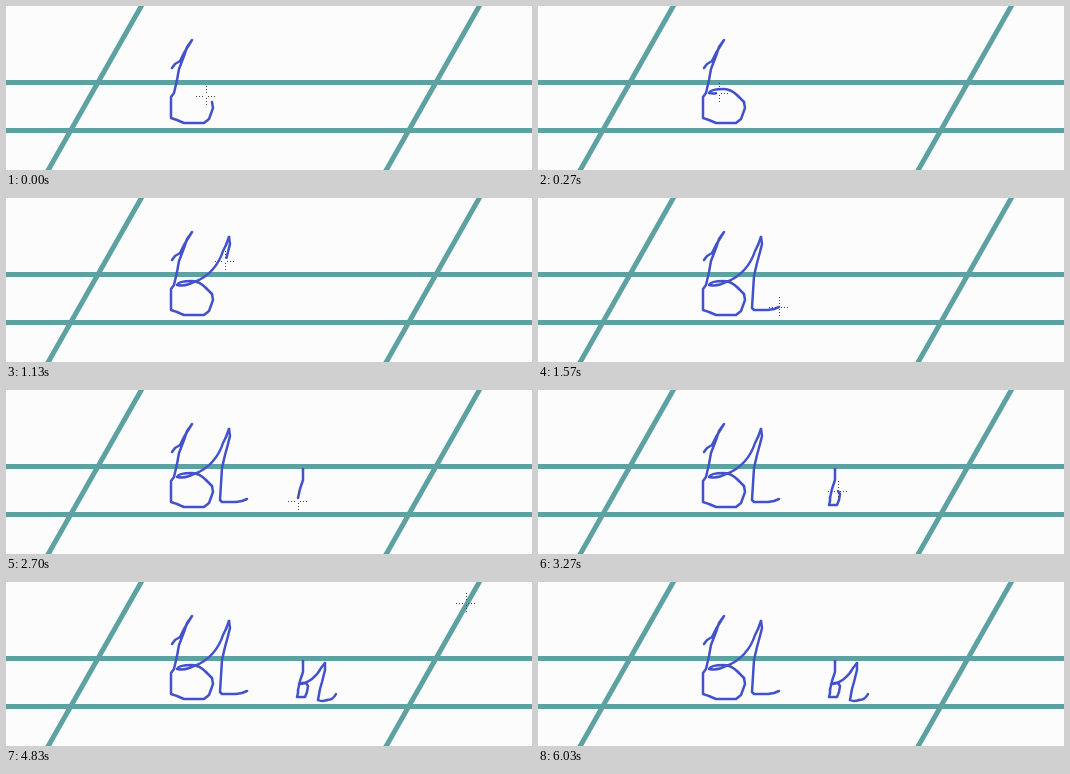
These frames come from a looping animation (526x164 px, 6.4 s). An HTML page:

```html
<!DOCTYPE html>
<html lang="en">
<head>
<meta charset="utf-8">
<title>Handwriting on ruled lines</title>
<style>
  html, body { margin: 0; width: 100%; height: 100%; overflow: hidden; background: #fcfcfd; }
  svg { display: block; }
  path { fill: none; }
  #rules { stroke: #5da1a2; stroke-width: 5; }
  #ink { stroke: #4352c8; stroke-width: 2.5; stroke-linecap: round; stroke-linejoin: round; }
  #cursor { stroke: #444; stroke-width: 1; stroke-dasharray: 1 2; shape-rendering: crispEdges; }
</style>
</head>
<body>
<svg width="526" height="164" viewBox="0 0 526 164">
  <path id="rules" d="M0 76.5H526M0 124.5H526M137 -3L40 168M475 -3L378 168"/>
  <g id="ink">
    <path d="M166 62L169 58 174 55 178 47 186 34 181 41 178 50 173 63 171 74 168 87 165 91V112L171 114 178 117H198L203 113 207 102 206 96"/>
  </g>
  <path id="cursor" d="M-10 .5H-1M2 .5H11M.5 -10V-1M.5 2V11"/>
</svg>
<script>
const LOOP = 6400, FPS = 30, LAG = .6, HIDE = 180;
const ink = document.getElementById('ink');
const cursor = document.getElementById('cursor');

// [start tick, end tick, path, pen is up]
const moves = [
  [-.6, 0, 'M206 96L200 90'],
  [0, 19, 'M200 90C196 86 191 83 186 83C179 83 172 84 171 87C176 88 183 87 188 84C203 79 213 66 217 53L220 47'],
  [19, 23, 'M220 47L223 39'],
  [30, 46, 'M223 39L224 46 222 54 219 65 216 78 214 110 216 112H230L236 111 241 109'],
  [51, 61, 'M241 109L297 80', true],
  [65, 65.3, 'M297 79L297 80'],
  [80.1, 80.4, 'M297 80L297 90 294 99 292 108'],
  [80.4, 81, 'M292 108L292 111'],
  [81, 97.4, 'M292 111L291 115H299L301 110 302 104 300 101'],
  [102, 105, 'M300 101L297 101'],
  [109, 121, 'M297 101L293 102C302 102 311 94 315 86L319 81'],
  [121, 128, 'M319 81L319 88 316 100 314 107 312 118'],
  [128, 129, 'M312 118Q316 120 321 118'],
  [129, 132, 'M321 118Q327 118 330 112'],
  [132, 142, 'M330 112L473 13', true],
  [142, 146, 'M473 13L456 24', true]
].map(([from, to, d, up]) => {
  const path = document.createElementNS('http://www.w3.org/2000/svg', 'path');
  path.setAttribute('d', d);
  if (!up) ink.append(path);
  return { from, to, path, length: path.getTotalLength() };
});

const progress = (m, tick) => Math.min(1, Math.max(0, (tick - m.from) / (m.to - m.from)));

function draw(now) {
  const tick = Math.floor((now % LOOP + 4) * FPS / 1000);
  let active = moves[0];
  for (const m of moves) {
    if (m.from <= tick) active = m;
    const p = progress(m, tick - LAG);
    m.path.style.display = p > 0 ? '' : 'none';
    m.path.style.strokeDasharray = p < 1 ? `${p * m.length} 999` : 'none';
  }
  const at = active.path.getPointAtLength(progress(active, tick) * active.length);
  cursor.setAttribute('transform', `translate(${Math.round(at.x)} ${Math.round(at.y)})`);
  cursor.style.display = tick < HIDE ? '' : 'none';
}

const start = performance.now();

function loop() {
  draw(performance.now() - start);
  requestAnimationFrame(loop);
}
loop();
</script>
</body>
</html>
```
